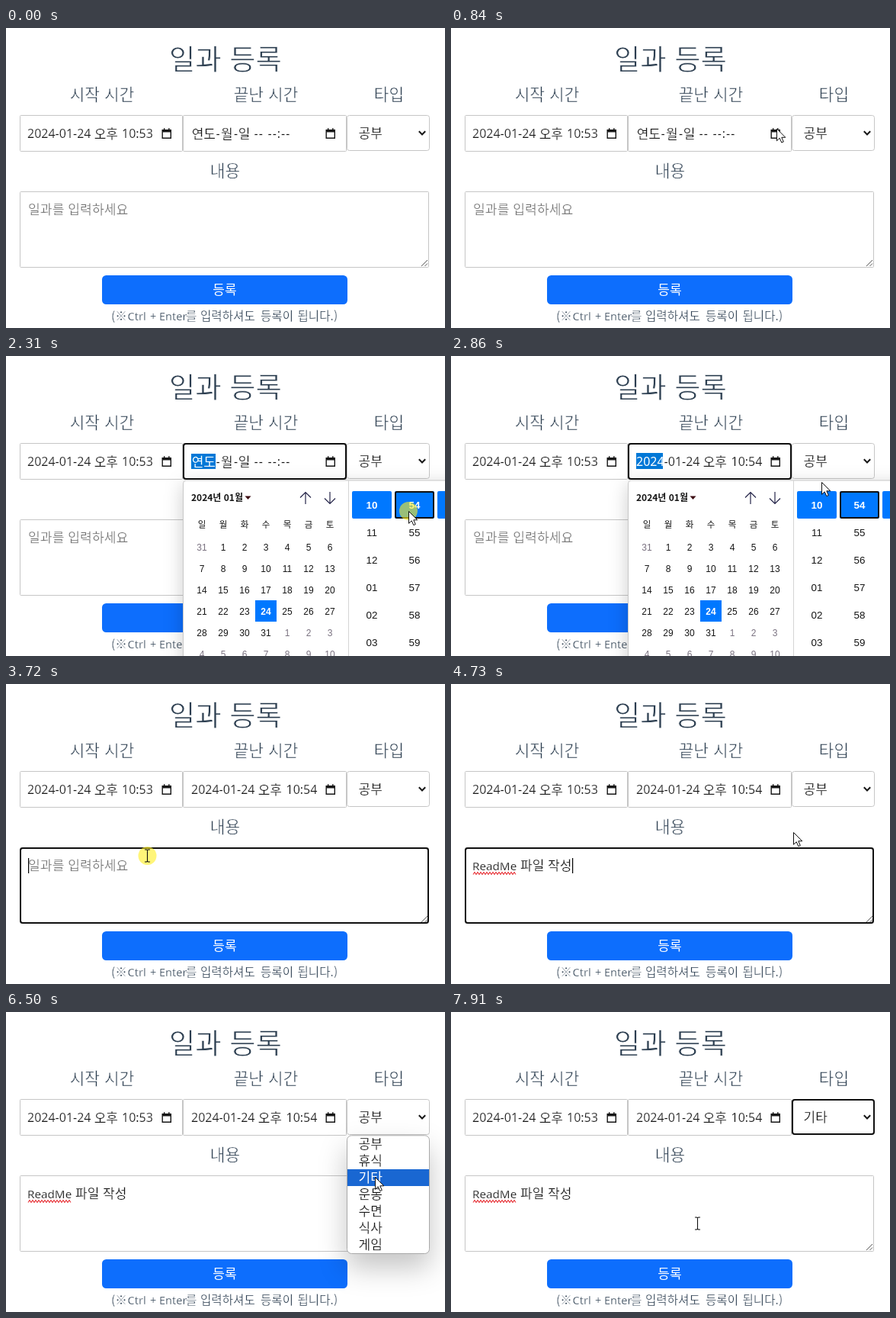
Write an HTML page that moves like this. It is 576 px wide and 393 px high and loops after 7.99 s.

```html
<!DOCTYPE html>
<html lang="ko">
<head>
<meta charset="utf-8">
<title>일과 등록</title>
<style>
  html, body { margin: 0; width: 100%; height: 100%; overflow: hidden; background: #fff; }
  svg { display: block; }
  /* a hairline in the page colour slims the regular weight */
  text { font: 17px "Noto Sans CJK KR", "Noto Sans CJK", "Noto Sans", sans-serif; fill: #161616; stroke: #fff; stroke-width: .25; }
  text.num { font: 16px "Noto Sans", "Open Sans", sans-serif; }
  text.word { font-size: 15.2px; }
  text.head { font-size: 21.4px; fill: #2c3e50; stroke-width: .55; text-anchor: middle; }
  text.title { font-size: 37.4px; stroke-width: .8; }
  text.note { font-size: 15.6px; fill: #2c3e50; stroke-width: .3; }
  text.latin { font-size: 14.5px; }
  text.hint { font-size: 17.2px; fill: #757575; }
  #picker text { stroke: none; }
  text.month { font-size: 12px; font-weight: 700; }
  text.week { font-size: 11.5px; text-anchor: middle; }
  text.day, text.time { font: 12px "Liberation Sans", Arial, sans-serif; text-anchor: middle; }
  text.time { font-size: 13.4px; }
  text.out { fill: #7a7280; }
  text.on, .on { fill: #fff; stroke: none; }
  text.bold { font-weight: 700; }
  .box { fill: #fff; stroke: #c6c6c6; }
  .ring { fill: none; stroke: #101010; stroke-width: 2; }
  .line { fill: none; stroke: #161616; }
  .pick { fill: #0078ff; }
  .mark { fill: #0078d7; }
  #picker { filter: drop-shadow(0 6px 12px rgba(0, 0, 0, .2)); }
  #menu { filter: drop-shadow(0 18px 18px rgba(0, 0, 0, .23)); }
</style>
</head>
<body>
<svg width="576" height="393" viewBox="0 0 576 393">
  <defs>
    <g id="calendar">
      <path class="line" stroke-width="1.4" d="M.7 2.7H11.8V13.3H.7Z"/>
      <path fill="#161616" d="M.5 2H12V5.4H.5ZM2.4 .3H3.9V3H2.4ZM8.6 .3H10.1V3H8.6Z"/>
    </g>
  </defs>

  <text class="head title" x="288" y="55">일과 등록</text>
  <text class="head" x="126" y="95">시작 시간</text>
  <text class="head" x="341" y="95">끝난 시간</text>
  <text class="head" x="502.5" y="95">타입</text>
  <text class="head" x="287.5" y="195">내용</text>

  <rect class="box" x="18.5" y="114.5" width="213" height="47" rx="1"/>
  <rect class="box" x="232.5" y="114.5" width="214" height="47" rx="1"/>
  <rect class="box" x="447.5" y="114.5" width="108" height="46" rx="3"/>
  <rect class="box" x="18.5" y="214.5" width="536" height="99" rx="1"/>
  <use href="#calendar" x="204.5" y="131"/>
  <use href="#calendar" x="419.5" y="131"/>
  <path class="line" stroke-width="2" d="M541.8 135.3l4.2 4.2 4.2-4.2"/>
  <path class="line" stroke-width=".9" style="stroke:#444" d="M545 312l8-8M549.5 312l3.5-3.5"/>

  <g id="start">
    <text class="num" x="28" y="144">2024-01-24</text>
    <text x="115.7" y="144.5">오후</text>
    <text class="num" x="152" y="144">10:53</text>
  </g>
  <g id="blank">
    <rect id="yearMark" class="mark" x="243" y="128" width="32" height="20"/>
    <text id="year" x="243.7" y="144.5">연도</text>
    <text class="num" x="275.5" y="144">-</text>
    <text x="282" y="144.5">월</text>
    <text class="num" x="299" y="144">-</text>
    <text x="304.7" y="144.5">일</text>
    <text class="num" x="325.5" y="144" letter-spacing="1">--</text>
    <text class="num" x="343.5" y="144" letter-spacing="1">--:--</text>
  </g>
  <g id="end">
    <rect id="endMark" class="mark" x="243" y="127" width="35" height="21"/>
    <text class="num" x="243" y="144"><tspan id="endYear">2024</tspan>-01-24</text>
    <text x="330.7" y="144.5">오후</text>
    <text class="num" x="367.5" y="144">10:54</text>
  </g>
  <rect id="endRing" class="ring" x="233" y="115" width="213" height="46" rx="3"/>
  <text id="kind" x="462.5" y="144">공부</text>
  <rect id="kindRing" class="ring" x="448" y="115" width="107" height="45" rx="3"/>

  <text id="hint" class="hint" x="29" y="244">일과를 입력하세요</text>
  <g id="entry">
    <text class="num word" x="28" y="244">ReadMe</text>
    <text x="91" y="244">파일</text>
    <text x="127" y="244">작성</text>
    <path id="squiggle" fill="none" stroke="#e8383d" stroke-width="1.1"/>
  </g>
  <rect id="areaRing" class="ring" x="19" y="215" width="535" height="98" rx="3"/>
  <rect id="caret" y="228" width="1.2" height="20" fill="#000"/>

  <rect x="126" y="324" width="322" height="38" rx="5.5" fill="#0d6efd"/>
  <text class="on" x="287" y="349.3" text-anchor="middle">등록</text>
  <text class="note" x="138" y="382.5">(※</text>
  <text class="num note latin" x="159.5" y="382.5">Ctrl</text>
  <text class="num note latin" x="189" y="382.5">+</text>
  <text class="num note latin" x="201" y="382.5">Enter</text>
  <text class="note" x="236" y="382.5">를</text>
  <text class="note" x="255" y="382.5">입력하셔도</text>
  <text class="note" x="334" y="382.5">등록이</text>
  <text class="note" x="382.5" y="382.5">됩니다.)</text>

  <g id="picker">
    <rect x="232.5" y="163" width="420" height="300" rx="4" fill="#fff" stroke="#c8c8c8"/>
    <path class="line" style="stroke:#d4d4d4" d="M449.5 163V393"/>
    <text class="month" x="243" y="190.3">2024년 01월</text>
    <path fill="#3c0a12" d="M313.5 183.5h8l-4 4.5z"/>
    <path class="line" style="stroke:#26264a" stroke-width="1.2" d="M393 194V178.5M386 185.5l7-7 7 7M425 178v15.5M418 186.5l7 7 7-7"/>
  </g>

  <g id="menu">
    <rect x="447.5" y="161.8" width="108" height="154.7" rx="6" fill="#fff" stroke="#a9a9a9"/>
    <rect id="hover" x="448" width="107" height="22" fill="#1967d2"/>
  </g>

  <circle id="click" r="12" fill="#ffee20" opacity=".6"/>
  <path id="arrow" fill="#fff" stroke="#111" stroke-width="1" d="M.5 .5V16.3L4.2 12.8 6.8 18.6 9.3 17.5 6.8 11.8H11.8Z"/>
  <path id="beam" fill="none" stroke="#111" stroke-width="1.1" d="M-3.5-8H-1L0-7.2 1-8H3.5M-3.5 8H-1L0 7.2 1 8H3.5M0-7.2V7.2"/>
</svg>
<script>
const LOOP = 7990;
const $ = id => document.getElementById(id);

function add(parent, tag, attrs, label) {
  const el = document.createElementNS('http://www.w3.org/2000/svg', tag);
  for (const key in attrs) el.setAttribute(key, attrs[key]);
  if (label !== undefined) el.textContent = label;
  return parent.appendChild(el);
}

// Month grid
const picker = $('picker');
[...'일월화수목금토'].forEach((name, i) =>
  add(picker, 'text', { class: 'week', x: 257 + 28 * i, y: 225.3 }, name));
add(picker, 'rect', { class: 'pick', x: 327, y: 320, width: 28, height: 28 });
const dayRing = add(picker, 'rect', { class: 'ring', x: 328, y: 321, width: 26, height: 26, rx: 1 });
for (let i = 0; i < 42; i++) {
  const day = (i + 30) % 31 + 1;
  const kind = i === 24 ? ' on bold' : i < 1 || i > 31 ? ' out' : '';
  add(picker, 'text', { class: 'day' + kind, x: 257 + 28 * (i % 7), y: 255.3 + 28 * Math.floor(i / 7) }, day);
}

// Hour, minute and half-day columns
[454, 510, 566].forEach(x =>
  add(picker, 'rect', { class: 'pick', x, y: 177, width: 52, height: 36, rx: 2 }));
const minuteRing = add(picker, 'rect', { class: 'ring', x: 511, y: 178, width: 50, height: 34, rx: 2 });
for (let i = 0; i < 6; i++) {
  const style = 'time' + (i ? '' : ' on bold');
  const hour = String((i + 9) % 12 + 1).padStart(2, '0');
  add(picker, 'text', { class: style, x: 480, y: 199.8 + 36 * i }, hour);
  add(picker, 'text', { class: style, x: 536, y: 199.8 + 36 * i }, 54 + i);
}

const options = ['공부', '휴식', '기타', '운동', '수면', '식사', '게임'].map((name, i) =>
  add($('menu'), 'text', { x: 462.5, y: 179.3 + 22 * i }, name));

let wave = 'M29 249.5';
for (let i = 0; i < 14; i++) wave += 'l2-3 2 3';
$('squiggle').setAttribute('d', wave);

// Pointer moves: first change, last change, steps, from, bend, to
const moves = [
  [380, 840, 7, [506, 335], [337, 200], [427, 131.5]],
  [1770, 2160, 6, [427, 131.5], [480, 150], [528, 203]],
  [2630, 2860, 4, [528, 203], [512, 176], [486, 165]],
  [2937, 3400, 7, [486, 165], [350, 160], [185.5, 225]],
  [4020, 4500, 7, [185.5, 225], [330, 215], [449, 194]],
  [5190, 5510, 5, [449, 194], [470, 165], [501, 147]],
  [6190, 6500, 5, [501, 147], [498, 190], [484, 216]],
  [7590, 7910, 5, [484, 216], [420, 165], [323.5, 277]],
];
const clicks = [[1310, 1470], [2310, 2460], [3720, 3790], [5740, 5890], [7360, 7440]];

function pointerAt(t) {
  const move = moves.filter(m => t >= m[0]).pop();
  if (!move) return null;
  const [first, last, steps, from, bend, to] = move;
  const step = Math.floor((t - first + 1) * (steps - 1) / (last - first)) + 1;
  const p = Math.min(1, step / steps);
  const e = p * p * (3 - 2 * p);
  return from.map((a, i) => (1 - e) ** 2 * a + 2 * e * (1 - e) * bend[i] + e * e * to[i]);
}

const show = (el, on) => { el.style.display = on ? '' : 'none'; };
const place = (el, [x, y]) => el.setAttribute('transform', `translate(${x} ${y})`);

function draw(t) {
  const within = (a, b) => t >= a && t < b;
  const pickerOpen = within(1470, 3720);
  const menuOpen = within(5740, 7360);
  const filled = t >= 2630;
  const typed = t >= 4730;

  show($('blank'), !filled);
  show($('end'), filled);
  show($('yearMark'), t >= 1310);
  $('year').setAttribute('class', t >= 1310 ? 'on' : '');
  show($('endMark'), t < 3720);
  $('endYear').setAttribute('class', t < 3720 ? 'on' : '');
  show($('endRing'), within(1310, 3720));

  show(picker, pickerOpen);
  show(dayRing, t < 2310);
  show(minuteRing, t >= 2310);

  show($('hint'), !typed);
  show($('entry'), typed);
  show($('areaRing'), within(3720, 5740));
  show($('caret'), within(3720, 4220) || within(4730, 5190));
  $('caret').setAttribute('x', typed ? 159 : 29);

  show($('menu'), menuOpen);
  show($('kindRing'), t >= 7360);
  $('kind').textContent = t >= 7360 ? '기타' : '공부';

  const pos = pointerAt(t);
  const [x, y] = pos || [0, 0];
  const row = Math.max(0, Math.floor((y - 162) / 22));
  $('hover').setAttribute('y', 162 + 22 * row);
  options.forEach((el, i) => el.setAttribute('class', i === row ? 'on' : ''));

  const covered = menuOpen && x > 447 || pickerOpen && x > 232;
  const inArea = x > 18 && x < 555 && y > 214 && y < 314 && !covered;
  show($('arrow'), pos && !inArea);
  show($('beam'), pos && inArea);
  show($('click'), clicks.some(([a, b]) => within(a, b)));
  [$('arrow'), $('beam'), $('click')].forEach(el => place(el, [x, y]));
}

const begin = performance.now();
function tick() {
  draw((performance.now() - begin) % LOOP);
  requestAnimationFrame(tick);
}
tick();
</script>
</body>
</html>
```
